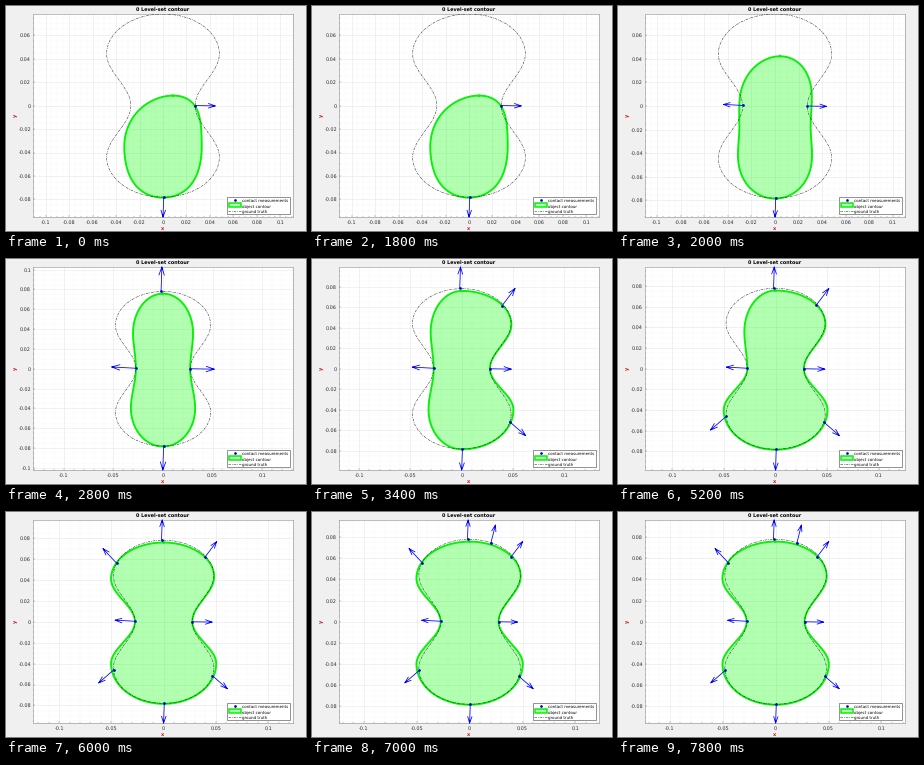
Recreate the animation shown at these times as a matplotlib script. Size 300 by 225 pixels, loop 8000 ms.

```python
import numpy as np
import matplotlib.pyplot as plt
from matplotlib.animation import FuncAnimation
from matplotlib.patches import Rectangle
from matplotlib.ticker import FuncFormatter, MultipleLocator

W, H, DPI = 300, 225, 100
PX = 72 / DPI
LEFT, RIGHT, TOP, BOTTOM = 27, 287, 8, 211
STEP, FRAMES = 200, 40
GREEN, BLUE, RED = "#08f008", "#0000ff", "#d01818"

plt.rcParams["font.family"] = "DejaVu Sans"
plt.rcParams["text.hinting"] = "none"

# Probing order: time in ms, x and y in mm, heading in degrees
PROBES = np.array([
    (0, 0.6, -77.8, -92), (0, 27.3, 0, -1), (2000, -27.4, 0.5, 177),
    (2400, -2, 78.3, 88), (3000, 46.5, -51.5, -41), (3400, 39.3, 61.5, 53),
    (4400, -47.7, -46, 221), (5600, -45, 56, 133), (6600, 20, 74, 76),
])

# Quarter outlines: widest half-width, its height, pole height (mm)
WAIST = 27.4
TRUE = (48, 44, 78)
THIN_TOP, THIN_LOW = (30.3, 36, 75.8), (32.4, 40, 78.5)
FULL_TOP, BULGE_TOP = (48.3, 43, 75.8), (50.3, 41, 75.8)
BULGE_LOW = (50.3, 40, 78.5)

QUARTER = np.linspace(0, np.pi / 2, 60)


def quarter(wide, peak, pole):
    """Half an ellipse cap above the widest place, a cosine down to the waist."""
    y = pole * np.cos(QUARTER)
    cap = wide * np.sqrt(np.clip(1 - ((y - peak) / (pole - peak)) ** 2, 0, 1))
    neck = WAIST + (wide - WAIST) * (1 - np.cos(np.pi * y / peak)) / 2
    return np.column_stack([np.where(y > peak, cap, neck), y])


def outline(ur, lr, ll, ul):
    """Join four quarters clockwise from the top."""
    return np.vstack([quarter(*ur), quarter(*lr)[::-1] * (1, -1),
                      quarter(*ll) * (-1, -1), quarter(*ul)[::-1] * (-1, 1)])


def egg():
    """First guess from two contacts, leaning right at the top."""
    t = np.concatenate([QUARTER + k * np.pi / 2 for k in range(4)])
    lean = 8.5 * np.maximum(np.cos(t), 0) ** 2
    x = 34.2 * np.sin(t) + 1.2 * np.sin(3 * t) + lean
    return np.column_stack([x, -35 + 43.5 * np.cos(t)])


def contour(n):
    if n == 2:
        return egg()
    shape = outline(FULL_TOP if n > 5 else THIN_TOP,
                    BULGE_LOW if n > 4 else THIN_LOW,
                    BULGE_LOW if n > 6 else THIN_LOW,
                    BULGE_TOP if n > 7 else THIN_TOP)
    return (egg() + shape) / 2 if n == 3 else shape


def arrows(bases, shafts):
    """Shafts and open heads as one line with gaps."""
    gap = (np.nan, np.nan)
    path = []
    for base, d in zip(bases, shafts):
        side = np.array([-d[1], d[0]]) * 0.11
        tip, neck = base + d, base + 0.67 * d
        path += [base, tip, gap, neck + side, tip, neck - side, gap]
    return np.array(path)


truth = outline(TRUE, TRUE, TRUE, TRUE)

fig = plt.figure(figsize=(W / DPI, H / DPI), dpi=DPI, facecolor="#f0f0f0")
ax = fig.add_axes([LEFT / W, 1 - BOTTOM / H, (RIGHT - LEFT) / W, (BOTTOM - TOP) / H])
ax.set_axisbelow(True)
ax.grid(which="major", color="#e4e4e4", lw=0.5 * PX)
ax.grid(which="minor", color="#ececec", lw=0.4 * PX, ls=":")
ax.tick_params(which="both", direction="in", color="#707070", width=0.4 * PX)
ax.tick_params(which="major", length=2.4 * PX, labelsize=4.9 * PX, labelcolor="#303030")
ax.tick_params(which="minor", length=1.2 * PX)
ax.tick_params(axis="x", pad=2.8 * PX)
ax.tick_params(axis="y", pad=2 * PX)
for spine in ax.spines.values():
    spine.set(color="#808080", linewidth=0.5 * PX)
for axis in (ax.xaxis, ax.yaxis):
    axis.set_major_formatter(FuncFormatter(lambda v, _: f"{round(v) / 1000:g}"))
ax.yaxis.set_major_locator(MultipleLocator(20))
ax.yaxis.set_minor_locator(MultipleLocator(5))

DASH = dict(color="#202020", lw=0.5 * PX, ls=(0, (5, 2, 1.5, 2)))
DOT = dict(ls="none", marker="o", ms=2.7 * PX, mfc="#0000c8", mec="none")
fill, = ax.fill([0], [0], fc=(0, 1, 0, 0.3), ec="none", zorder=2)
edge, = ax.plot([], [], color=GREEN, lw=1.9 * PX, zorder=3)
ax.plot(*truth.T, zorder=4, **DASH)
quiver, = ax.plot([], [], color=BLUE, lw=0.8 * PX, zorder=5, clip_on=False)
dots, = ax.plot([], [], zorder=6, **DOT)

# Overlay in stage pixels for the labels and the legend
top = fig.add_axes([0, 0, 1, 1], zorder=5)
top.set(xlim=(0, W), ylim=(H, 0))
top.axis("off")


def label(x, y, text, size, color="black", **kw):
    top.text(x, y, text, fontsize=size * PX, color=color, **kw)


MID = dict(ha="center", va="center", weight="bold")
label(157, 4, "0 Level-set contour", 4.86, **MID)
label(157, 222.6, "x", 5, RED, **MID)
label(10, 109.5, "y", 5, RED, rotation=90, **MID)

top.add_patch(Rectangle((220.5, 190.5), 63.5, 17, fc="white", ec="#505050", lw=0.6 * PX))
top.plot(228.5, 194, **DOT)
top.add_patch(Rectangle((222.5, 197.4), 12.5, 3.8, fc="#b2ffb2", ec=GREEN, lw=1.5 * PX))
top.plot([222, 235], [204.7, 204.7], **DASH)
for row, name in enumerate(("contact measurements", "object contour", "ground truth")):
    label(236, 194.1 + 5.25 * row, name, 4.06, va="center_baseline")


def update(i):
    probes = PROBES[PROBES[:, 0] <= i * STEP]
    n = len(probes)
    bases, heading = probes[:, 1:3], np.radians(probes[:, 3])
    # Arrows shrink as contacts fill their bounding box
    length = 0.295 * np.hypot(*np.ptp(bases, axis=0)) / np.sqrt(n)
    shafts = length * np.column_stack([np.cos(heading), np.sin(heading)])

    shape = contour(n)
    fill.set_xy(shape)
    edge.set_data(*shape.T)
    dots.set_data(*bases.T)
    quiver.set_data(*arrows(bases, shafts).T)

    # Tight limits around truth and arrow tips, with equal scales
    extent = np.vstack([truth, bases + shafts])
    lo, hi = extent.min(axis=0), extent.max(axis=0)
    span = (hi[1] - lo[1]) * (RIGHT - LEFT) / (BOTTOM - TOP)
    cx = (lo[0] + hi[0]) / 2
    ax.set_xlim(cx - span / 2, cx + span / 2)
    ax.set_ylim(lo[1], hi[1])
    fine = span < 240
    ax.xaxis.set_major_locator(MultipleLocator(20 if fine else 50))
    ax.xaxis.set_minor_locator(MultipleLocator(5 if fine else 10))
    return fill, edge, dots, quiver


anim = FuncAnimation(fig, update, frames=FRAMES, interval=STEP,
                     repeat=True, repeat_delay=0, blit=False)
plt.show()
```
